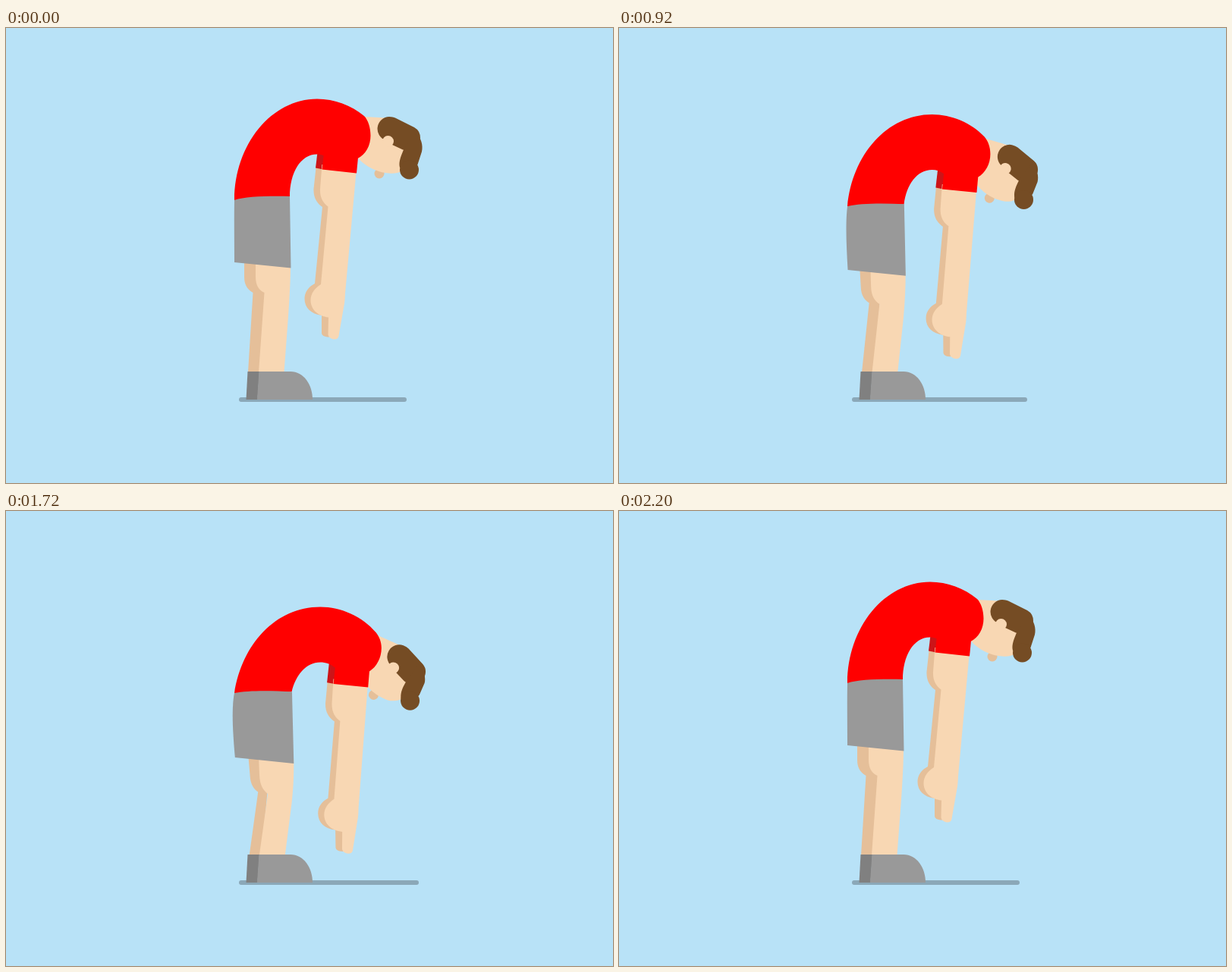
Recreate the animation shown at these times as an HTML page. Size 800 by 600 pixels, loop 2.8 s.

```html
<!DOCTYPE html>
<html lang="en">
<head>
<meta charset="utf-8">
<title>Toe touch</title>
<style>
  html, body { margin: 0; width: 100%; height: 100%; overflow: hidden; background: #b8e2f7; }
  svg { display: block; width: 100%; height: 100%; }
  .skin { fill: #f8d7b3; }
  .shade { fill: #e5bf99; }
  .hair { fill: #754c24; }
  .shirt { fill: #f00; }
  .cloth { fill: #999; }
</style>
</head>
<body>
<svg viewBox="0 0 800 600">
  <line id="ground" x1="310" y1="490" x2="525" y2="490" stroke="#8ba8b8" stroke-width="6" stroke-linecap="round"/>

  <path id="backLeg" class="shade"/>
  <path id="frontLeg" class="skin"/>
  <path fill="#808080" d="M318.5 453H334L331.5 490H316.5Z"/>
  <path class="cloth" d="M333.5 453H375C392 453 404 470 404 490H331Z"/>

  <g class="arm">
    <path class="shade" d="M409 180L405.5 212C405 224 410 231 417 236L407 337C399 341 393.5 348 393.5 357C393.5 369 402 377 416 379V402C416 405 419 407.5 426 407.5L432 300L420 180Z"/>
    <path fill="#cc1418" d="M411 160L408 184.5L418 186.5L420 160Z"/>
  </g>

  <g id="sway">
    <g id="head">
      <circle class="shade" cx="492" cy="192" r="6.5"/>
      <path class="skin" d="M455 116L500 118.5L540 145L532 180C526 189 515 193 505 191.5C488 191 470 180 463 170Z"/>
      <path class="hair" d="M500 148A16 16 0 0 1 505 117Q510 117 513 118.5L538 131Q546 135.5 546 145L540 165L523 160.5L505 152Z"/>
      <circle class="skin" cx="503.5" cy="149.5" r="7.5"/>
    </g>
    <path id="fringe" class="hair"/>
    <circle id="curl" class="hair" cx="531.5" r="12.5"/>
  </g>

  <path id="torso" class="shirt"/>
  <path id="shorts" class="cloth"/>

  <g class="arm">
    <path class="skin" d="M416.5 180L414 212C413.5 224 418 231 424.5 235.5L415 338C407 343 401.5 350 401.5 359C401.5 371 411 380 425 381.5L424.5 404C424.5 407 428 410 432.5 410.5C436 410.5 438 409 438.5 406L445.5 366Q446.5 362 447 350L462 185Z"/>
    <path class="shirt" d="M462 165L464 171L462 191.5L416.5 186.5L419 165Z"/>
  </g>
</svg>
<script>
const LOOP = 2800, STEP = 40;
const DOWN = 480, LOW = 1560, UP = 2200;

// Each shape: upright pose, bent pose
const shapes = {
  backLeg: [
    'M314 305L314 328C314 340 319 345 325.5 349L319 454L336 454L345 305Z',
    'M320 322L323 353C323.5 364 328 371 333.5 374.5L321 454L337 454L350 322Z'],
  frontLeg: [
    'M329 305L329 328C329 340 334 346 340.5 349L333 454L366.5 454L372 380C374 350 375 330 375 312Z',
    'M333.5 322L335 353C335.5 365 340 373 346 377.5L334 454L368 454L377.5 385C379.5 370 380.5 350 380 330Z'],
  fringe: [
    'M540 140C547 143 550 155 548 163L542.5 180L536 190L519 184C517 176 521 168 525 158Z',
    'M543 214C551 220 553 234 551 239L544 254L536 262L519.5 259C519 250 522 245 526 238Z'],
  torso: [
    'M301 227C301 153.5 350 93.5 410 93.5C433 93.5 455 102 472 116C477 121 480.5 131 480.5 142C480.5 155 474 167 463.5 172L419 168.5C416 167 413 166.5 410 166.5C388 166.5 374 191 374 222.5Z',
    'M301 242.5C313 180 356 132.5 415 132.5C443 132.5 473 146 490 168C495 174 497.5 181 497.5 188C497.5 201 491 213 481.5 219L437 214C430 208 423 205.5 415 205.5C397 205.5 383 221 377 241.5Z'],
  shorts: [
    'M301 227C315 222 345 221.5 374 222L375.5 316.5L301 309C301 280 300.5 255 301 227Z',
    'M301 242.5C320 239 350 239.5 377.5 241.5L380 336L302 328C299 300 296 262 301 242.5Z']
};

const $ = id => document.getElementById(id);
const mix = (a, b, p) => a + (b - a) * p;
const number = /[\d.]+/g;

function mixPath([a, b], p) {
  const ends = b.match(number);
  let i = 0;
  return a.replace(number, n => mix(+n, +ends[i++], p).toFixed(2));
}

function bezier(u, x1, y1, x2, y2) {
  const at = (s, a, b) => 3 * (1 - s) * s * ((1 - s) * a + s * b) + s ** 3;
  let lo = 0, hi = 1;
  for (let i = 0; i < 24; i++) {
    const s = (lo + hi) / 2;
    if (at(s, x1, x2) < u) lo = s; else hi = s;
  }
  return at(lo, y1, y2);
}

function bend(t) {
  if (t <= DOWN || t >= UP) return 0;
  return t < LOW
    ? bezier((t - DOWN) / (LOW - DOWN), .167, .167, .667, 1)
    : 1 - bezier((t - LOW) / (UP - LOW), .333, 0, .667, 1);
}

function draw(now) {
  const p = bend(Math.floor(now % LOOP / STEP) * STEP);
  for (const id in shapes) $(id).setAttribute('d', mixPath(shapes[id], p));
  for (const arm of document.querySelectorAll('.arm'))
    arm.setAttribute('transform', `translate(${18 * p} ${48.5 * p}) rotate(${-1.05 * p} 462 191.5)`);
  $('sway').setAttribute('transform', `translate(${8 * p * (1 - p)} 0)`);
  $('head').setAttribute('transform', `translate(${14 * p} ${70 * p}) rotate(${25 * p} 505 133)`);
  $('curl').setAttribute('cy', mix(187, 262, p));
  $('ground').setAttribute('x2', mix(525, 544, p));
  requestAnimationFrame(draw);
}
draw(0);
</script>
</body>
</html>
```
